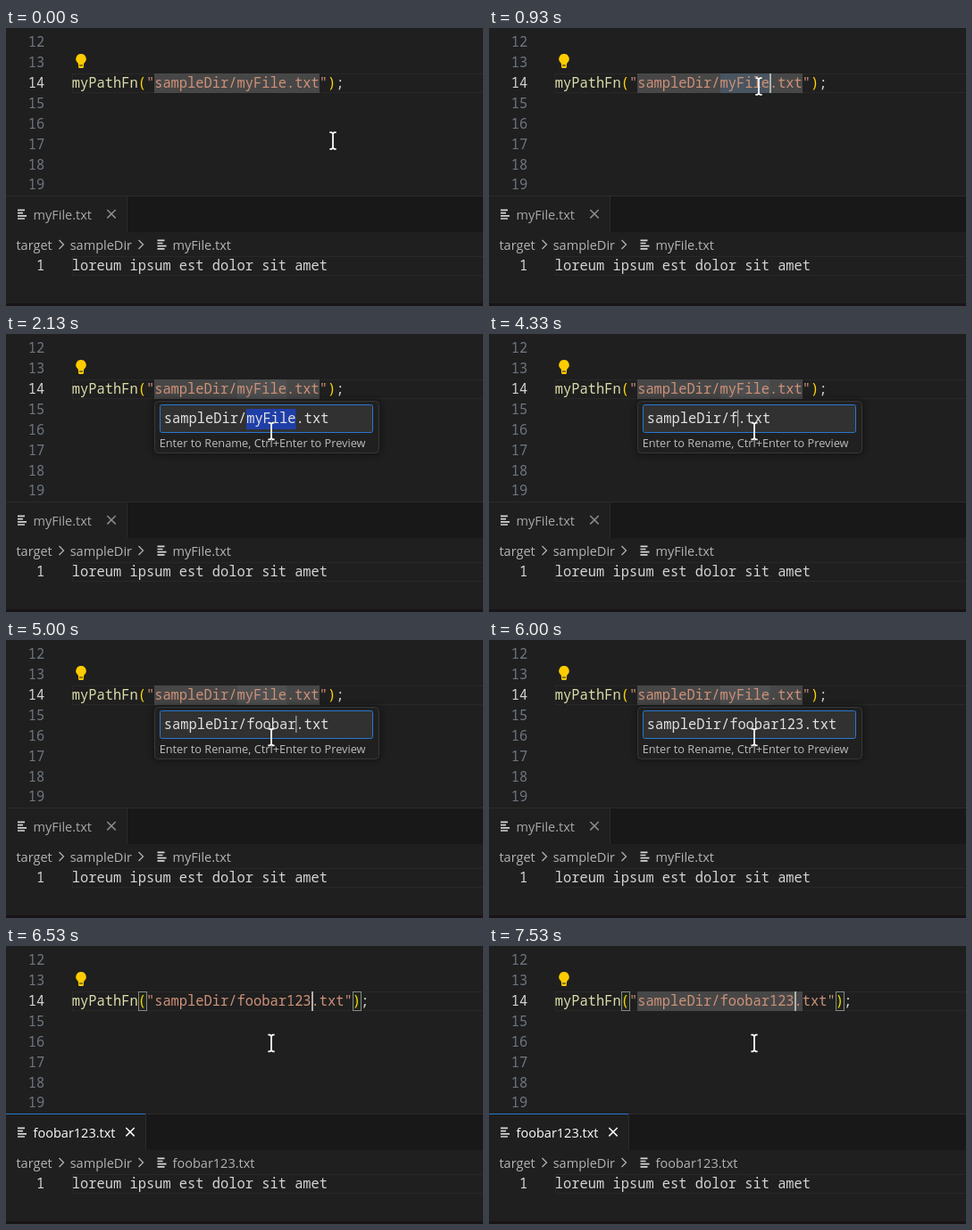
Animation of 534 by 312 pixels, one loop 8000 ms. Source, as an HTML page:

```html
<!DOCTYPE html>
<html lang="en">
<head>
<meta charset="utf-8">
<title>Rename file path</title>
<style>
  html, body { margin: 0; width: 100%; height: 100%; overflow: hidden; background: #1f1f1f; }
  svg { display: block; width: 534px; height: 312px; }
  text { white-space: pre; }
  .mono { font: 500 15.4px "Noto Sans Mono", "Liberation Mono", monospace; fill: #d4d4d4; }
  .ui { font: 14.5px "Open Sans", "Noto Sans", sans-serif; fill: #b4b4b4; }
  .num { fill: #6e7681; text-anchor: end; font-weight: 400; }
  .on { fill: #d4d4d4; font-weight: 500; }
  .fn { fill: #dcdcaa; }
  .paren { fill: #ffd700; }
  .str { fill: #ce9178; }
  .edge { fill: #2b2b2b; }
  .row { fill: none; stroke: #282828; }
  .match { fill: #1d261d; stroke: #888; }
  .chev { fill: none; stroke: #b0b0b0; stroke-width: 1.3; }
  .icon { fill: none; stroke: #d4d7d6; stroke-width: 1.7; }
  .caret { fill: #aeafad; }
</style>
</head>
<body>
<svg viewBox="0 0 534 312">
  <defs>
    <path id="file" class="icon" d="M1 1H9M1 4.2H7M1 7.4H11M1 10.6H9"/>
    <path id="chevron" class="chev" d="M0 0L5 5L0 10"/>
    <filter id="blur" x="-20%" y="-50%" width="140%" height="200%">
      <feGaussianBlur stdDeviation="4"/>
    </filter>
  </defs>
  <rect width="534" height="312" fill="#1f1f1f"/>

  <rect class="row" x="74.5" y="51.5" width="470" height="21"/>
  <rect id="mark" x="166" y="51" width="185" height="22" fill="#474747"/>
  <rect id="sel" x="259" y="51" width="55.5" height="22"/>
  <g id="brackets">
    <rect class="match" x="148.5" y="51.5" width="9" height="21"/>
    <rect id="close" class="match" y="51.5" width="9" height="21"/>
  </g>
  <g id="numbers"></g>
  <path d="M84 29A5.7 5.7 0 0 1 88.2 38.6Q87.2 39.6 87 41V43.4Q87 45 85.4 45H82.6Q81 45 81 43.4V41Q80.8 39.6 79.8 38.6A5.7 5.7 0 0 1 84 29Z" fill="#ffcc00"/>
  <path d="M82 42H86" stroke="#1f1f1f"/>
  <text class="mono" x="73.8" y="67"><tspan class="fn">myPathFn</tspan><tspan class="paren">(</tspan><tspan class="str">"sampleDir/<tspan id="codeName"></tspan>.txt"</tspan><tspan class="paren">)</tspan>;</text>
  <rect id="caret" class="caret" y="51" width="2" height="22"/>

  <rect y="188" width="534" height="41" fill="#181818"/>
  <rect class="edge" y="188" width="534" height="1"/>
  <rect id="tab" y="189" height="41" fill="#1f1f1f"/>
  <rect id="tabEdge" class="edge" y="189" width="1" height="40"/>
  <rect id="tabTop" y="188" height="1" fill="#2878d0"/>
  <use href="#file" x="12" y="203.4"/>
  <text id="tabName" class="ui" x="30.5" y="215"></text>
  <path id="cross" d="M-4.7 -4.7L4.7 4.7M4.7 -4.7L-4.7 4.7" fill="none" stroke-width="1.5"/>

  <text class="ui" x="11.5" y="249">target</text>
  <use href="#chevron" x="59.5" y="238"/>
  <text class="ui" x="71.7" y="249">sampleDir</text>
  <use href="#chevron" x="148.5" y="238"/>
  <use href="#file" x="168.5" y="237.3"/>
  <text id="crumbName" class="ui" x="186.5" y="249"></text>

  <rect class="row" x="74.5" y="256.5" width="470" height="21"/>
  <text class="mono num on" x="43.2" y="272">1</text>
  <text class="mono" x="73.8" y="272">loreum ipsum est dolor sit amet</text>
  <rect y="309" width="534" height="3" fill="#181418"/>

  <g id="rename">
    <rect x="164" y="73" width="256" height="63" rx="6" fill-opacity=".36" filter="url(#blur)"/>
    <rect x="166.5" y="75.5" width="251" height="58" rx="4" fill="#202020" stroke="#373737"/>
    <rect x="172.5" y="79.5" width="238" height="31" rx="2" fill="#313131" stroke="#2878d0"/>
    <rect id="inputSel" x="269" y="84" width="55.5" height="23" fill="#1f3fa8"/>
    <text class="mono" x="176.8" y="100.3" style="fill:#e0e0e0">sampleDir/<tspan id="inputName"></tspan>.txt</text>
    <rect id="inputCaret" class="caret" y="85" width="1.2" height="19"/>
    <text class="ui" x="171.7" y="127" style="font-size:12.75px;fill:#bcbcbc">Enter to Rename, Ctrl+Enter to Preview</text>
  </g>

  <path id="mouse" d="M-3.7 -9.3H-1.5L0 -8L1.5 -9.3H3.7M0 -8V8M-3.7 9.3H-1.5L0 8L1.5 9.3H3.7" fill="none" stroke="#fff" stroke-width="1.8"
    style="filter:drop-shadow(0 0 .6px #000)"/>
</svg>
<script>
  const LOOP = 8000, STEP = 200 / 3, CHAR = 9.24;
  const OLD = "myFile", NEW = "foobar123";
  const KEYS = [4330, 4400, 4530, 4670, 4800, 5000, 5330, 5400, 5470];
  const $ = {};
  document.querySelectorAll("svg [id]").forEach(el => $[el.id] = el);

  for (let i = 0; i < 8; i++) {
    const y = Math.round(21.4 + i * 22.86);
    $.numbers.insertAdjacentHTML("beforeend",
      `<text class="mono num${i === 2 ? " on" : ""}" x="43.2" y="${y}">${12 + i}</text>`);
  }

  const set = (el, attrs) => { for (const k in attrs) el.setAttribute(k, attrs[k]); };
  const show = (el, on) => set(el, { visibility: on ? "inherit" : "hidden" });
  const write = (el, s) => { if (el.textContent !== s) el.textContent = s; };
  const ease = p => { p = Math.min(1, Math.max(0, p)); return p * p * (3 - 2 * p); };
  const within = (t, a, b) => t >= a && t < b;

  function draw(t) {
    // The pointer is sampled at 15 steps per second.
    const tick = Math.floor((t + 4) / STEP);
    const a = ease(tick / 13), b = ease((tick - 18) / 6);
    set($.mouse, { transform: `translate(${366 - 64 * a - 5 * b} ${126.5 - 61 * a + 43.5 * b})` });

    const coded = t >= 6470, done = t >= 6530, open = within(t, 1870, 6400);
    write($.codeName, coded ? NEW : OLD);
    show($.mark, t < 6400 || t >= 6730);
    show($.sel, within(t, 930, 6400));
    set($.sel, { fill: t < 1870 ? "#495560" : "#4f5051" });
    show($.brackets, within(t, 865, 930) || done);
    set($.close, { x: coded ? 388.5 : 360.5 });
    show($.caret, within(t, 930, 1470) || within(t, 6470, 7000) || t >= 7530);
    set($.caret, { x: coded ? 342 : 314 });

    const name = (done ? NEW : OLD) + ".txt", width = done ? 156 : 135;
    write($.tabName, name);
    write($.crumbName, name);
    set($.tab, { width });
    set($.tabEdge, { x: width });
    set($.tabTop, { width });
    show($.tabTop, done);
    $.tabName.style.fill = done ? "#fff" : "#a8a8a8";
    set($.cross, { transform: `translate(${width - 17} 208.7)`, stroke: done ? "#fff" : "#8c8c8c" });

    const typed = KEYS.filter(k => t >= k).length;
    show($.rename, open);
    write($.inputName, typed ? NEW.slice(0, typed) : OLD);
    show($.inputSel, t >= 1930 && !typed);
    show($.inputCaret, typed && t < 6000);
    set($.inputCaret, { x: 176.8 + (10 + typed) * CHAR - 0.4 });

    // Children would otherwise stay visible while the box is closed.
    set($.rename, { display: open ? "inline" : "none" });
  }

  const start = performance.now();
  function frame() {
    draw((performance.now() - start) % LOOP);
    requestAnimationFrame(frame);
  }
  frame();
</script>
</body>
</html>
```
